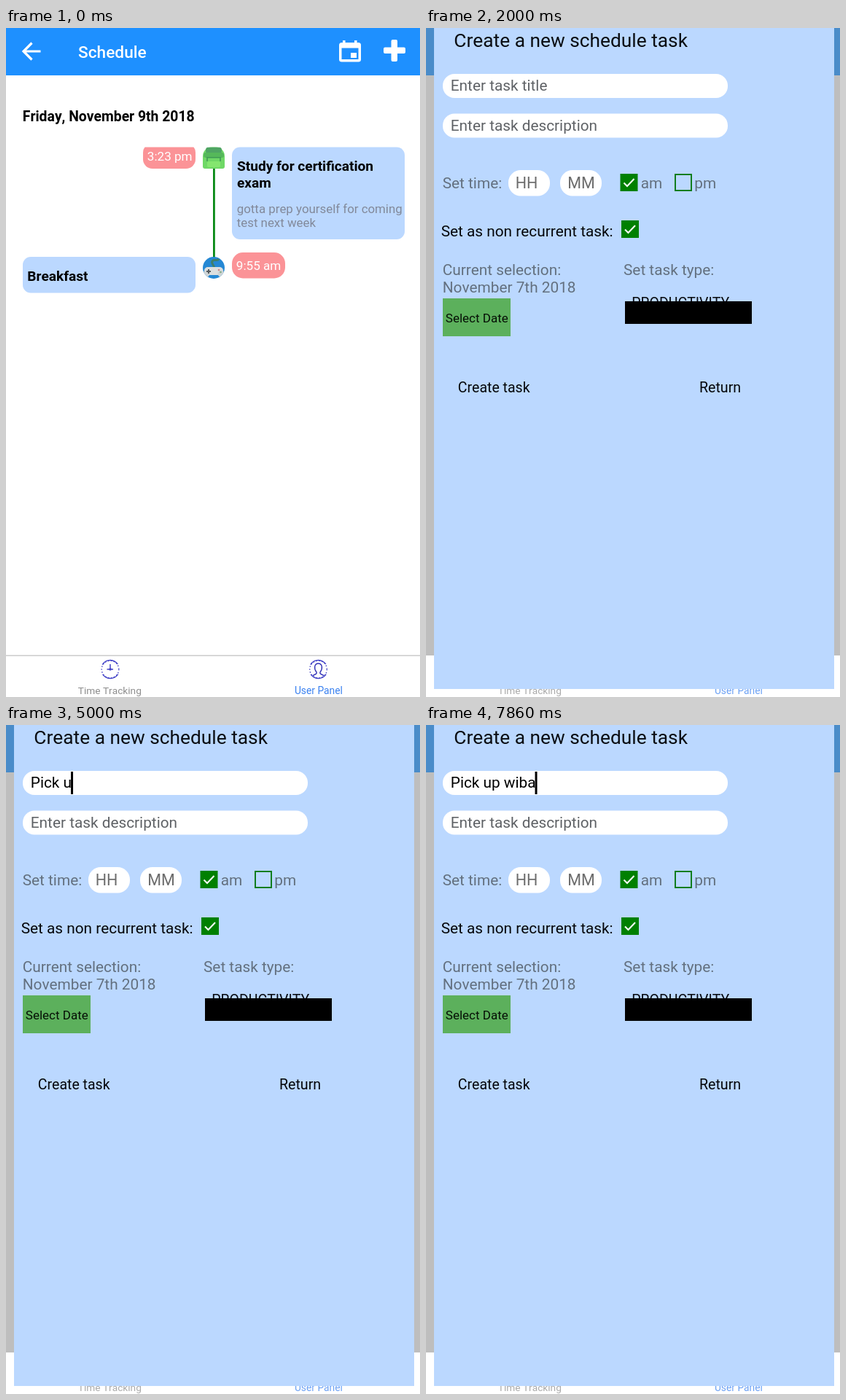
An HTML page with a canvas that plays this animation: 568 px wide and 918 px high, repeating every 8000 ms.

```html
<!DOCTYPE html>
<html lang="en">
<head>
<meta charset="utf-8">
<title>Schedule</title>
<style>
html, body { margin: 0; width: 100%; height: 100%; overflow: hidden; background: #fff; }
canvas { display: block; }
</style>
</head>
<body>
<canvas id="stage" width="568" height="918"></canvas>
<script>
const ctx = document.getElementById('stage').getContext('2d');
const LOOP = 8000, PRESS = 1710, OPEN = 1990, FOCUS = 4000, TYPE_START = 4280, TYPE_END = 5800;
const ENTRY = 'Pick up wiba';
const BLUE = '#1e90ff', PANEL = '#bbd8ff', PINK = '#fb9397', GREEN = '#008000';

ctx.fontKerning = 'none';

function rect(x, y, w, h, color) {
  ctx.fillStyle = color;
  ctx.fillRect(x, y, w, h);
}

function round(x, y, w, h, r, color) {
  ctx.fillStyle = color;
  ctx.beginPath();
  ctx.roundRect(x, y, w, h, r);
  ctx.fill();
}

function disc(x, y, r, color) {
  ctx.fillStyle = color;
  ctx.beginPath();
  ctx.arc(x, y, r, 0, Math.PI * 2);
  ctx.fill();
}

function stroke(d, color, width) {
  ctx.strokeStyle = color;
  ctx.lineWidth = width;
  ctx.stroke(new Path2D(d));
}

function text(s, x, y, size, color, weight = 400, align = 'left') {
  ctx.font = `${weight} ${size}px Roboto, sans-serif`;
  ctx.textAlign = align;
  ctx.fillStyle = color;
  ctx.fillText(s, x, y);
}

function clipped(x, y, w, h, draw) {
  ctx.save();
  ctx.beginPath();
  ctx.rect(x, y, w, h);
  ctx.clip();
  draw();
  ctx.restore();
}

function header(plusAlpha) {
  rect(0, 0, 568, 65, BLUE);
  stroke('M47.5 32H25M35.5 20.5L24 32L35.5 43.5', '#fff', 3.2);
  text('Schedule', 99, 41, 22.7, '#fff', 500);

  round(457, 20, 30, 26.5, 3.5, '#fff');
  rect(462, 17, 3.5, 5, '#fff');
  rect(478, 17, 3.5, 5, '#fff');
  rect(460.5, 27.5, 23, 15.5, BLUE);
  rect(473, 34, 8, 7, '#fff');

  ctx.globalAlpha = plusAlpha;
  ctx.fillStyle = '#fff';
  ctx.beginPath();
  ctx.roundRect(518, 26.5, 30, 8.5, 2);
  ctx.roundRect(528.5, 16, 8.5, 30, 2);
  ctx.fill();
  ctx.globalAlpha = 1;
}

function backpack() {
  round(270, 163, 30, 30, [13, 13, 3, 3], '#6fd866');
  round(274, 163.5, 22, 9, 4, '#4fa563');
  round(271, 171, 28, 7, 3, '#55b85a');
  rect(275, 177, 20, 1.5, '#3f9a55');
  rect(275, 178, 2, 5, '#4aa458');
  rect(293, 178, 2, 5, '#4aa458');
  round(276, 183, 18, 8, 2, '#84e66f');
}

function gamepad() {
  ctx.save();
  ctx.beginPath();
  ctx.arc(285, 329, 15, 0, Math.PI * 2);
  ctx.clip();
  rect(270, 314, 30, 30, '#2588d4');
  stroke('M286 331C286 324 281 324 283 320S290 321 292 317', '#3f7f6b', 3);
  round(272, 328, 26, 11, 5, '#dcdfdf');
  disc(275, 337, 4.5, '#ced4d6');
  disc(295, 337, 4.5, '#ced4d6');
  stroke('M275 334H281M278 331V337', '#555c60', 2);
  disc(292, 332, 1.3, '#c98787');
  disc(294.5, 335, 1.3, '#82ad85');
  ctx.restore();
}

function tabLabels() {
  text('Time Tracking', 142.3, 913.5, 13.7, '#8e8e8e', 400, 'center');
  text('User Panel', 428.9, 913.5, 13.8, '#3b82f0', 400, 'center');
}

function tabs() {
  rect(0, 860.5, 568, 1.3, '#c4c4c4');
  for (const x of [143, 428.5]) {
    ctx.strokeStyle = '#4545c8';
    ctx.lineWidth = 1.4;
    for (const start of [-2.6, 0.55]) {
      ctx.beginPath();
      ctx.arc(x, 880, 12.5, start, start + 2);
      ctx.stroke();
    }
    ctx.setLineDash([1.5, 2.5]);
    ctx.beginPath();
    ctx.arc(x, 880, 11.8, 0, Math.PI * 2);
    ctx.stroke();
    ctx.setLineDash([]);
  }
  stroke('M143 873V880M138.5 880H147', '#4545c8', 1.5);
  disc(143, 880, 1.8, '#4545c8');
  stroke('M421 889C423 886 427 888 426 884C422 879 423 872 428.5 872S435 879 431 884C430 888 434 886 436 889',
    '#3535b8', 1.4);
  tabLabels();
}

function schedule(plusAlpha) {
  rect(0, 0, 568, 918, '#fff');
  header(plusAlpha);
  text('Friday, November 9th 2018', 22.8, 128, 19.35, '#000', 700);

  rect(284, 190, 2.8, 126, '#098a16');
  clipped(0, 163.5, 568, 600, () => {
    round(188, 158, 72, 35, 13, PINK);
    backpack();
  });
  text('3:23 pm', 193.8, 182.3, 17.1, '#fff');
  round(310, 163.5, 237, 126.5, 11, PANEL);
  text('Study for certification', 317, 196.3, 19.1, '#000', 700);
  text('exam', 317, 218.6, 19.1, '#000', 700);
  text('gotta prep yourself for coming', 316.8, 254.3, 16.85, '#82899a');
  text('test next week', 316.8, 273.4, 16.85, '#82899a');

  round(23, 314, 237, 49.5, 11, PANEL);
  text('Breakfast', 29.3, 346.6, 19.1, '#000', 700);
  gamepad();
  round(310, 308, 73, 35.5, 15, PINK);
  text('9:55 am', 315.8, 332.4, 17.1, '#fff');
  tabs();
}

function checkbox(x, y, on) {
  if (on) {
    rect(x, y, 24, 24, GREEN);
    stroke(`M${x + 5} ${y + 12.5}l4.5 4.5l9.5 -10`, '#fff', 2);
  } else {
    ctx.strokeStyle = '#117d1d';
    ctx.lineWidth = 2;
    ctx.strokeRect(x + 1, y + 1, 22, 22);
  }
}

function titleField(t) {
  const size = 20.8, x = 33.8, y = 86.3;
  const step = (TYPE_END - TYPE_START) / (ENTRY.length - 1);
  const count = t < TYPE_START ? 0 : Math.min(ENTRY.length, 1 + Math.floor((t - TYPE_START) / step + 1e-6));
  const typed = ENTRY.slice(0, count);
  text(typed || 'Enter task title', x, y, size, typed ? '#000' : '#5f6266');

  const typing = t >= TYPE_START && t < TYPE_END;
  const since = t - (t < TYPE_START ? FOCUS : TYPE_END);
  if (t >= FOCUS && (typing || since % 1000 < 500)) {
    rect(x + ctx.measureText(typed).width - 1, 64, 3, 31, '#000');
  }
}

function form(t) {
  const gray = '#63707f', size = 20.8;
  rect(0, 0, 568, 918, '#fff');
  rect(0, 0, 568, 65, '#4a8cc9');
  rect(0, 65, 568, 796, '#bebebe');
  ctx.globalAlpha = 0.75;
  tabLabels();
  ctx.globalAlpha = 1;
  rect(11, 0, 549, 907, PANEL);

  text('Create a new schedule task', 38.3, 26.3, 26.3, '#0a0d12');
  round(23, 63, 391, 33, 16, '#fff');
  titleField(t);
  round(23, 117.5, 391, 33, 16, '#fff');
  text('Enter task description', 33.8, 141.3, size, '#5f6266');

  text('Set time:', 22.7, 220.3, size, gray);
  round(113, 195, 57, 35.5, 17, '#fff');
  round(184, 195, 57, 35.5, 17, '#fff');
  text('HH', 138, 220.2, 21.5, '#6c6c6c', 400, 'center');
  text('MM', 213, 220.2, 21.5, '#6c6c6c', 400, 'center');
  checkbox(266.5, 200, true);
  text('am', 294.7, 220.3, size, gray);
  checkbox(341, 200, false);
  text('pm', 368.3, 220.3, size, gray);

  text('Set as non recurrent task:', 20.7, 286.3, size, '#05070a');
  checkbox(268, 264, true);

  text('Current selection:', 22.7, 338.7, size, gray);
  text('November 7th 2018', 22.7, 362.7, size, gray);
  text('Set task type:', 271, 338.7, size, gray);
  rect(23, 371, 93, 52, '#5cb05c');
  text('Select Date', 69.8, 404, 17, '#061006', 400, 'center');
  text('PRODUCTIVITY', 282.3, 383.6, 19.5, '#0a0d12');
  rect(273, 375, 174, 31, '#000');

  text('Create task', 43.8, 499.5, 19.5, '#05070a');
  text('Return', 375, 499.5, 19.6, '#05070a');
}

function frame() {
  const t = performance.now() % LOOP;
  if (t < OPEN) {
    const press = Math.min(1, Math.max(0, (t - PRESS) / 150));
    schedule(1 - 0.5 * press);
  } else {
    form(t);
  }
  requestAnimationFrame(frame);
}
frame();
</script>
</body>
</html>
```
